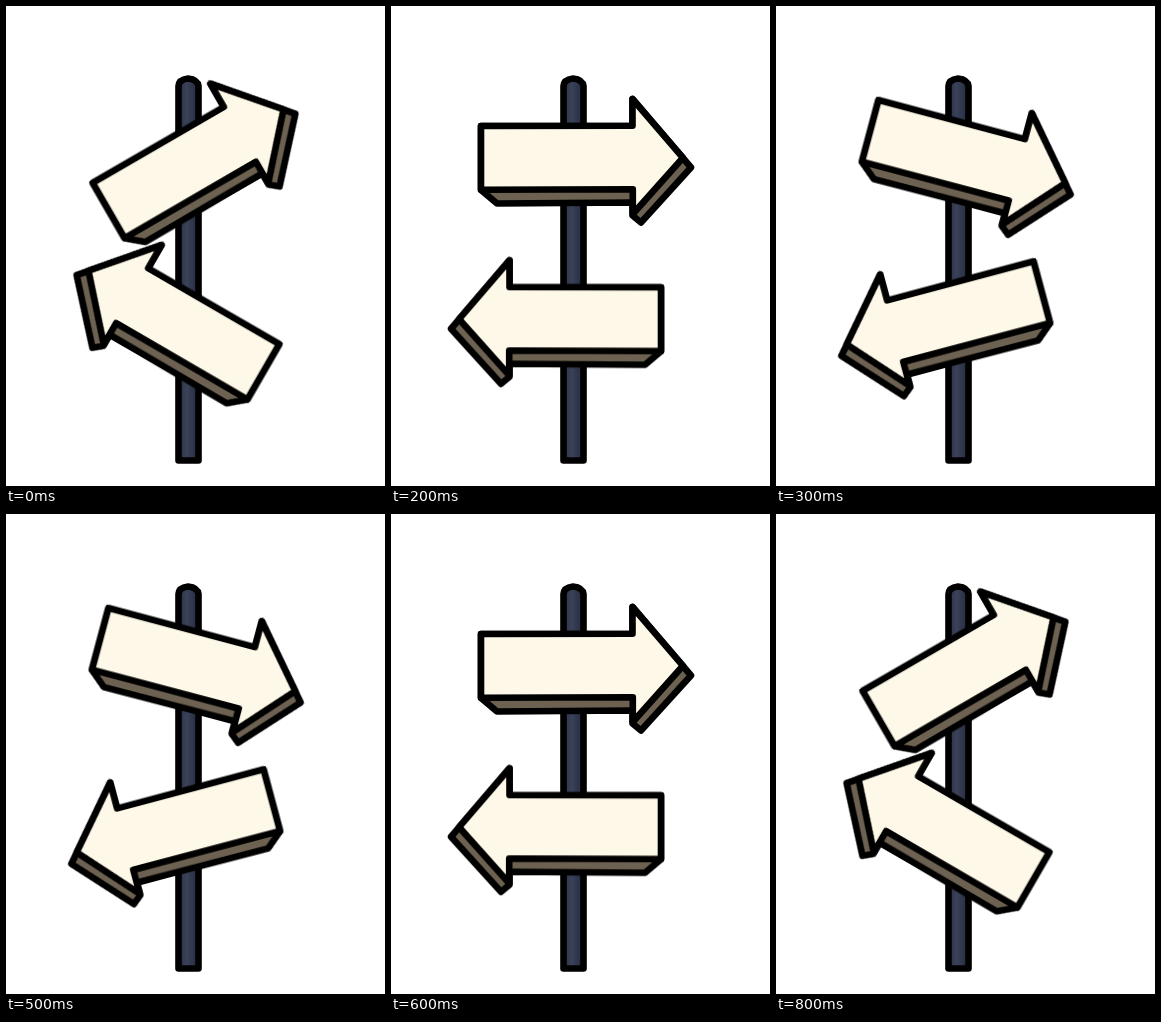
An HTML page for the animation above (0.9 s loop, 379 by 480 pixels).

```html
<!DOCTYPE html>
<html lang="en">
<head>
<meta charset="utf-8">
<title>Signpost</title>
<style>
  html, body { margin: 0; width: 100%; height: 100%; overflow: hidden; background: #fff; }
  svg { display: block; width: 100%; height: 100%; }
  .ink { stroke: #000; stroke-width: 6.6; stroke-linejoin: round; stroke-linecap: round; }
  .sign { transform-origin: 194.5px 154.5px; }
</style>
</head>
<body>
<svg viewBox="0 0 379 480">
  <defs>
    <linearGradient id="steel">
      <stop offset=".15" stop-color="#30374c"/>
      <stop offset=".4" stop-color="#3a4259"/>
      <stop offset=".85" stop-color="#2a3045"/>
    </linearGradient>
    <g id="arrow" class="ink">
      <path fill="#6d6251" d="M90 120 L90 184 L106 197.5 L241.5 196.5 L241.5 209.5 L250 216.5 L300 161.5 L241.5 93 L241.5 119.8 Z"/>
      <path fill="#fdf8e7" d="M90 120 L241.5 119.8 L241.5 93 L292 151.8 L241.8 208 L241.8 183.2 L90 183.7 Z"/>
    </g>
  </defs>
  <path class="ink" fill="url(#steel)" d="M172.5 454.5 V80 Q173 73.5 182 72.5 Q191.5 73.5 192.5 80 V454.5 Z"/>
  <use class="sign" href="#arrow"/>
  <g transform="translate(360 161.3) scale(-1 1)">
    <use class="sign" href="#arrow"/>
  </g>
</svg>
<script>
  const STEP = 100;
  const angles = [-30, -15, 0, 15, 30, 15, 0, -15, -30];

  const keyframes = [...angles, angles[0]].map((angle, i) => ({
    transform: `rotate(${angle}deg)`,
    offset: i / angles.length,
    easing: 'step-end'
  }));

  for (const sign of document.querySelectorAll('.sign')) {
    sign.animate(keyframes, { duration: STEP * angles.length, iterations: Infinity });
  }
</script>
</body>
</html>
```
